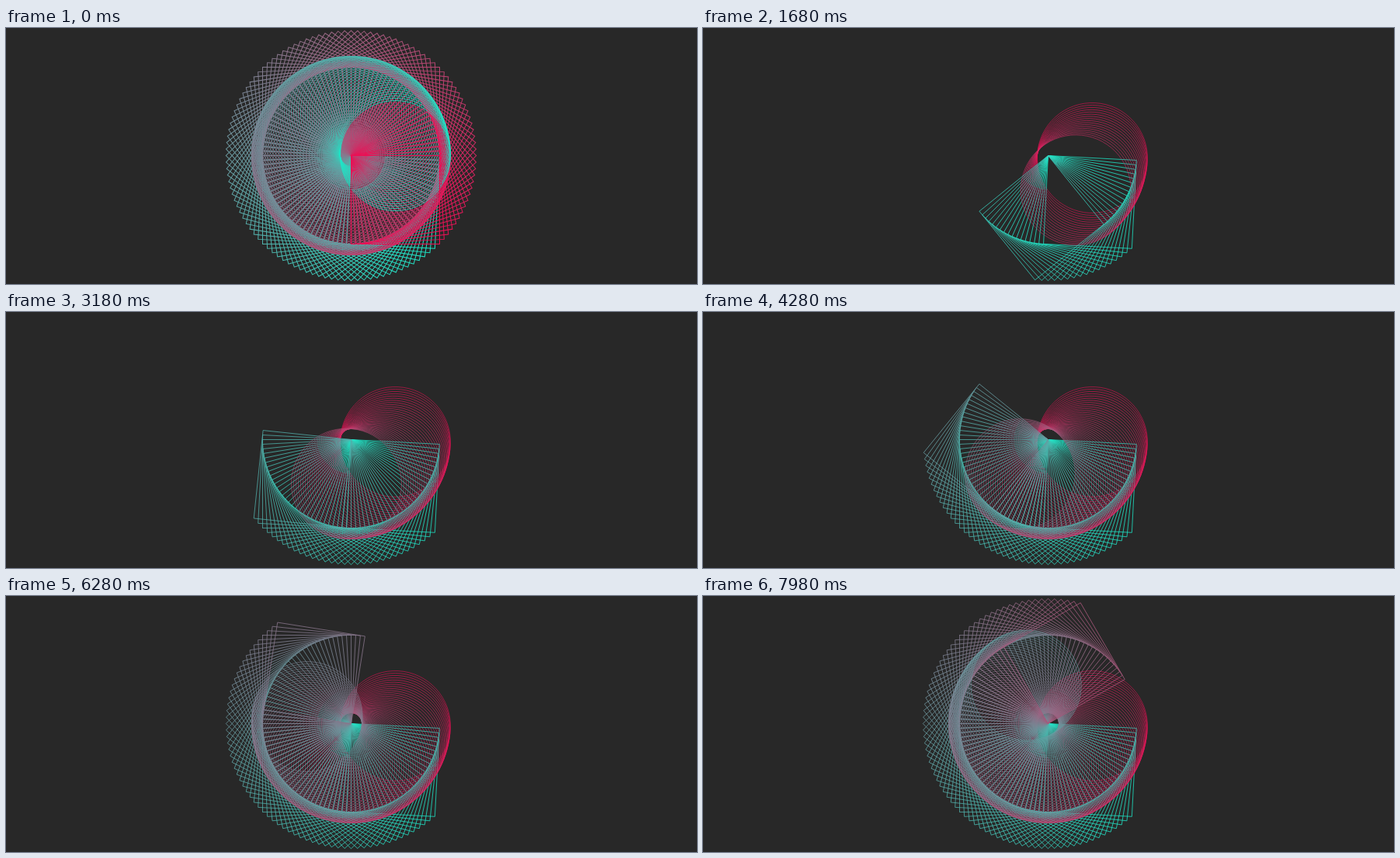
Recreate the animation shown at these times as an HTML page with a canvas. Size 890x330 px, loop 8000 ms.

```html
<!DOCTYPE html>
<html lang="en">
<head>
<meta charset="utf-8">
<title>Spirograph</title>
<style>
html, body { margin: 0; width: 100%; height: 100%; overflow: hidden; background: #282828; }
canvas { display: block; }
</style>
</head>
<body>
<canvas id="stage" width="890" height="330"></canvas>
<script>
const W = 890, H = 330, CX = 444.5, CY = 164.5;
const LOOP = 8000, STEP = 100, START = 20, FADE = 60, EXIT = 500;
const COUNT = 120, SIDE = 114, ORBIT = 57, RADIUS = 71;
const TEAL = [28, 234, 202], CRIMSON = [236, 14, 84];
const THIN = 0.75, FULL = 1, CIRCLE_ALPHA = 0.75;

const ctx = document.getElementById('stage').getContext('2d');
const layer = document.createElement('canvas');
layer.width = W;
layer.height = H;
const layerCtx = layer.getContext('2d');

const clamp = v => Math.max(0, Math.min(1, v));

function mix(a, b, k) {
  return `rgb(${a.map((v, i) => Math.round(v + (b[i] - v) * k)).join(',')})`;
}

// One circle and one square, turned together around the centre.
function drawPair(c, n, alpha) {
  const k = n / COUNT;
  c.save();
  c.rotate(k * Math.PI * 2);
  c.globalAlpha = alpha * CIRCLE_ALPHA;
  c.strokeStyle = mix(CRIMSON, TEAL, k);
  c.beginPath();
  c.arc(ORBIT, 0, RADIUS, 0, Math.PI * 2);
  c.stroke();
  c.globalAlpha = alpha;
  c.strokeStyle = mix(TEAL, CRIMSON, k);
  c.strokeRect(0, 0, SIDE, SIDE);
  c.restore();
}

function drawFigure(c, alphaOf, weight, scale = 1) {
  c.save();
  c.translate(CX, CY);
  c.scale(scale, scale);
  c.lineWidth = weight / scale;
  for (let n = 1; n <= COUNT; n++) {
    const alpha = alphaOf(n);
    if (alpha > 0) drawPair(c, n, alpha);
  }
  c.restore();
}

function render(t) {
  ctx.fillStyle = '#282828';
  ctx.fillRect(0, 0, W, H);

  // The finished figure grows and fades while the next one begins.
  const exit = clamp((t - START / 2) / EXIT);
  if (exit < 1) {
    layerCtx.clearRect(0, 0, W, H);
    drawFigure(layerCtx, () => 1, FULL, 1 + 0.45 * exit);
    ctx.globalAlpha = 1 - exit;
    ctx.drawImage(layer, 0, 0);
    ctx.globalAlpha = 1;
  }

  drawFigure(ctx, n => clamp((t - START - (n - 1) * STEP) / FADE), THIN);
}

const origin = performance.now();
function tick() {
  render((performance.now() - origin) % LOOP);
  requestAnimationFrame(tick);
}
tick();
</script>
</body>
</html>
```
